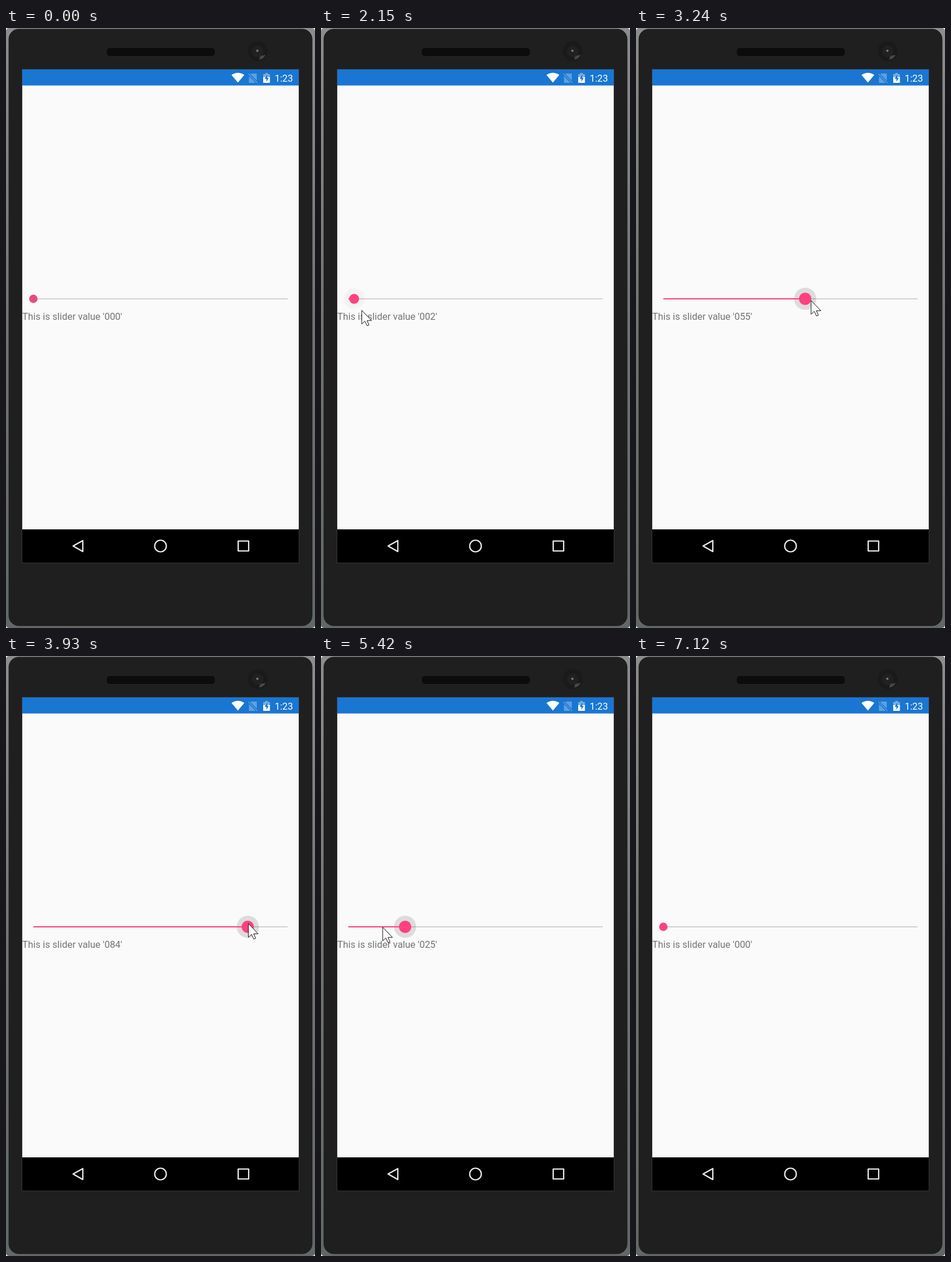
Animation of 531 by 1028 pixels, one loop 7820 ms. Source, as an HTML page:

```html
<!DOCTYPE html>
<html lang="en">
<head>
<meta charset="utf-8">
<title>Slider on a phone</title>
<style>
  html, body { margin: 0; width: 100%; height: 100%; overflow: hidden; background: #fff; }
  svg { display: block; width: 531px; height: 1028px; }
  text { font-family: Roboto, sans-serif; font-size: 16.4px; white-space: pre; }
</style>
</head>
<body>
<svg viewBox="0 0 531 1028">
  <defs>
    <linearGradient id="metal" x2="0" y2="1">
      <stop offset="0" stop-color="#8b8e8d"/>
      <stop offset=".5" stop-color="#6f7472"/>
      <stop offset="1" stop-color="#626866"/>
    </linearGradient>
  </defs>

  <!-- phone body -->
  <rect width="531" height="1028" rx="5" fill="url(#metal)"/>
  <rect x="5" y="2" width="521" height="1022" rx="17" fill="#1f1f1f" stroke="#181818"/>
  <rect x="172.5" y="33.5" width="187" height="15" rx="6" fill="#0c0c0c" stroke="#242424"/>
  <circle cx="432.5" cy="39.5" r="17" fill="#1a1a1a"/>
  <circle cx="432.5" cy="40" r="10" fill="#212122"/>
  <circle cx="432" cy="39" r="2" fill="#777"/>
  <path d="M435 54L437 48L446 46Q443 53 435 54Z" fill="#484849"/>

  <!-- screen -->
  <rect x="27.5" y="70.5" width="476" height="846" fill="#000" stroke="#353535"/>
  <rect x="28" y="98" width="475" height="761" fill="#fafafa"/>
  <rect x="28" y="71" width="475" height="27.5" fill="#1976d2"/>

  <!-- status icons -->
  <path d="M398.5 93.5L387.5 80.5Q398.5 73 409.5 80.5Z" fill="#fff"/>
  <path d="M421 78H431V90L420 79ZM417.5 82.5L429 94H417.5Z" fill="#5e9fdf"/>
  <path d="M416.5 78.5L432 94" stroke="#5e9fdf" stroke-width="1.3"/>
  <path d="M442 79H445.5V77H450V79H453.5V85H442Z" fill="#75ade4"/>
  <path d="M442 84H453.5V94H442Z" fill="#fff"/>
  <path d="M449 80L444.5 87H447.5V92L451.5 85.5H449Z" fill="#1976d2"/>
  <text x="461.7" y="91.6" fill="#fff">1:23</text>

  <!-- navigation buttons -->
  <g fill="none" stroke="#ececec" stroke-width="2.2" stroke-linejoin="round">
    <path d="M115.3 887.5L132 878.2V897Z"/>
    <circle cx="265.5" cy="887.5" r="10"/>
    <rect x="399" y="879" width="18" height="17"/>
  </g>

  <!-- slider -->
  <circle id="halo" cy="464" fill="#000"/>
  <path d="M47 464H484" stroke="#000" stroke-opacity=".16" stroke-width="2"/>
  <path id="fill" stroke="#ff4081" stroke-width="2"/>
  <circle id="thumb" cy="464"/>
  <text id="label" x="28" y="500" fill="#737373"></text>

  <path id="cursor" d="M.5 .5V24L6 19L9.8 27L13 25.7L9.6 18H17.3Z" fill="#fff" stroke="#111"/>
</svg>
<script>
const LOOP = 7820, STEP = 77, LEFT = 47, TRACK = 437;
const PRESS = 2080, RELEASE = 5800, SHOW = 210, HIDE = 7110;

const $ = id => document.getElementById(id);
const clamp = v => Math.max(0, Math.min(1, v));
const mix = (a, b, k) => a + (b - a) * k;

const glide = u => (u + (1 - Math.cos(Math.PI * u)) / 2) / 2;
const overshoot = u => 1 + 2.7 * (u - 1) ** 3 + 1.7 * (u - 1) ** 2;

// spans in which the picture is refreshed every STEP or so
const bursts = [[210, 360], [610, 1300], [1850, 3930], [4470, 6040], [6360, 7120]];

const pointerStart = { x: 307, y: 741 };
const pointerMoves = [
  { from: 210, to: 360, x: 217, y: 631 },
  { from: 560, to: 1300, x: 45, y: 485, ease: overshoot },
  { from: 1950, to: 3930, x: 416, y: 458 },
  { from: 4350, to: 5830, x: 11, y: 453, sway: 10 },
  { from: 6300, to: 7120, x: 500, y: 1028 }
];

const thumbStart = { x: LEFT, y: 464 };
const thumbMoves = [
  { from: 2068, to: 3930, x: 415.5, y: 464 },
  { from: 4394, to: 5870, x: LEFT, y: 464 }
];

function place(start, moves, t) {
  let { x, y } = start;
  for (const { from, to, ease = glide, sway = 0, ...end } of moves) {
    const k = ease(clamp((t - from) / (to - from)));
    x = mix(x, end.x, k);
    y = mix(y, end.y, k) - sway * Math.sin(2 * Math.PI * k);
  }
  return { x, y };
}

// holds the pose between refreshes
function snap(t) {
  const burst = bursts.filter(b => b[0] <= t).pop();
  if (!burst) return 0;
  const [start, end] = burst;
  const count = Math.round((end - start) / STEP);
  const k = Math.floor((t - start + 10) / (end - start) * count) / count;
  return mix(start, end, clamp(k));
}

function set(id, attrs) {
  for (const name in attrs) $(id).setAttribute(name, attrs[name]);
}

function draw(time) {
  const t = snap(time % LOOP);
  const thumbX = at => place(thumbStart, thumbMoves, at).x;
  const x = thumbX(t);
  const pointer = place(pointerStart, pointerMoves, t);
  const press = clamp((t - PRESS) / 200) * clamp(1 - (t - RELEASE) / 200);
  // the label trails the thumb on the way down
  const value = Math.floor((Math.max(x, thumbX(t - 50)) - LEFT) / TRACK * 100);

  set('halo', { cx: x, r: 16.5 + 2.5 * press, opacity: .12 * press ** 1.5 });
  set('fill', { d: `M${LEFT} 464H${x}` });
  set('thumb', { cx: x, r: 7.2 + 3.4 * press, fill: t < PRESS ? '#e84b82' : '#ff4081' });
  $('label').textContent = `This is slider value '${String(value).padStart(3, '0')}'`;
  set('cursor', {
    transform: `translate(${pointer.x} ${pointer.y})`,
    visibility: t >= SHOW && t < HIDE ? 'visible' : 'hidden'
  });
}

const begin = performance.now();
function tick() {
  draw(performance.now() - begin);
  requestAnimationFrame(tick);
}
tick();
</script>
</body>
</html>
```
